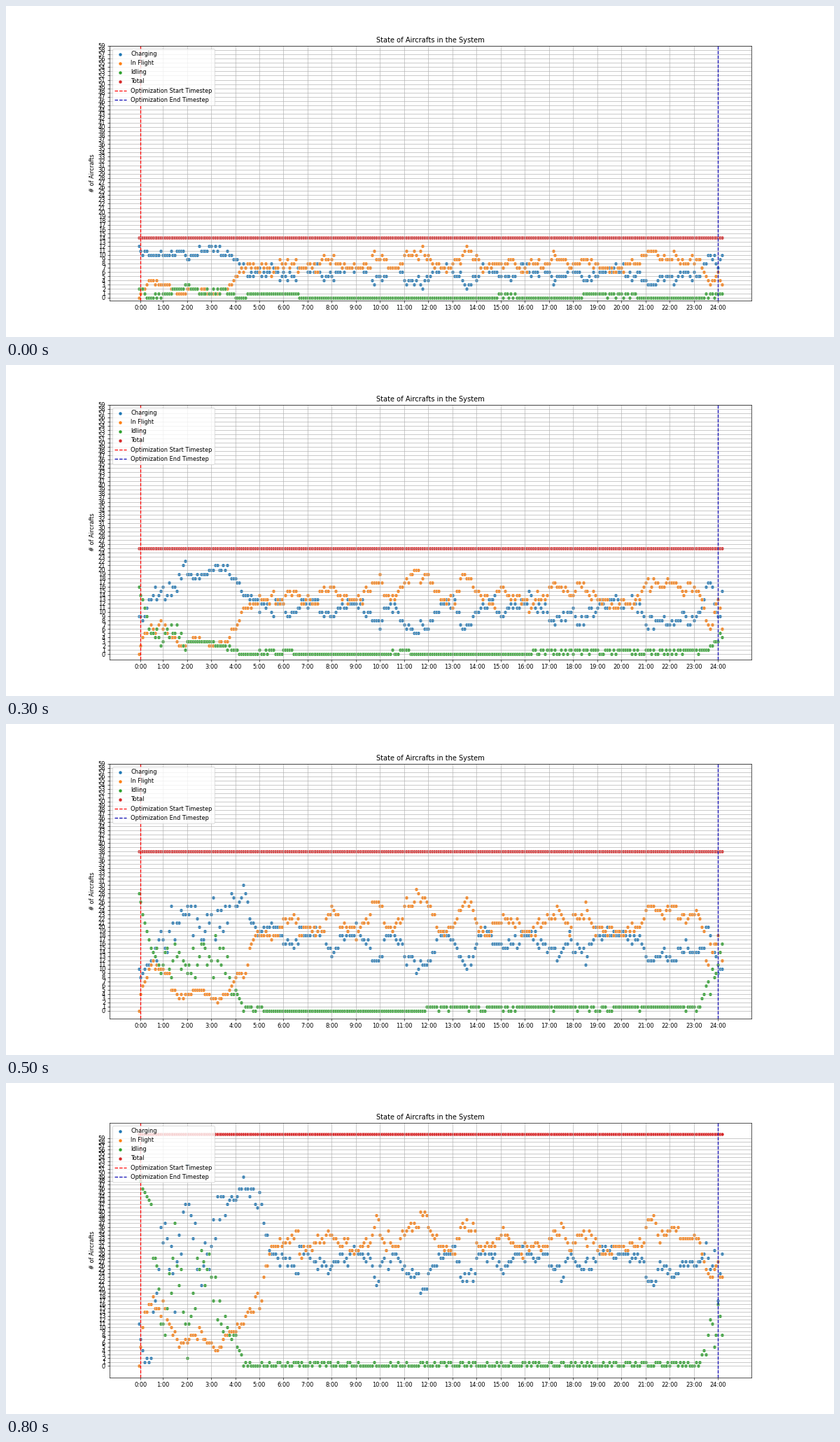
A matplotlib script for the animation above (900 ms loop, 1183 by 473 pixels).

```python
import matplotlib.pyplot as plt
import numpy as np
from matplotlib.animation import FuncAnimation

W, H, DPI = 1183, 473, 59.15
HOURS = np.arange(291) / 12     # five-minute timesteps
STEPS = HOURS * 12
N = len(STEPS)

# Demand peaks of the day: hour and height.
PEAKS = [(6.2, 3), (8, 5), (9.85, 8), (11.2, 8), (11.85, 9), (13.6, 9),
         (15.2, 4), (17.3, 6), (18.4, 5), (21.2, 8.5), (22.1, 6.5), (23, 5)]


def bell(center, width):
    return np.exp(-((HOURS - center) / width) ** 2 / 2)


SWING = (sum(v * bell(h, .3) for h, v in PEAKS) - 9 * bell(23.65, .2)
         - 60 * np.clip(HOURS - 24, 0, 1))


def fleet(total, gain, rise, morning, last, *spells):
    """Mean flying and idling counts; spells are (start, end, idle level)."""
    share = np.interp(HOURS,
                      [0, .1, .4, 1, 1.65, 2.4, 3.2, 3.7, rise - .4, rise],
                      [0, .12, .27, .25, .08, .15, .06, .14, .27, .5])
    idle = np.interp(HOURS, np.arange(len(morning) + 1) / 2, morning + [0])
    for start, end, level in spells:
        idle[(HOURS >= start) & (HOURS < end)] = level
    idle += last * np.clip(HOURS - 23.2, 0, 1)
    return total, total * share + gain * SWING, idle


def between(total, a, b):
    return total, (a[1] + b[1]) / 2, (a[2] + b[2]) / 2


xs = fleet(14, .4, 4.3, [2, 0, .7, 1.5, 2.5, 1.6, 1, 2, .4], 1,
           (4.5, 6.6, 1), (14.6, 15.6, .7), (18.4, 20.6, .9))
small = fleet(19, .53, 4.8, [14, 7, 4, 5, 3, 1, 5, 2, 2], 6,
              (4.7, 6.5, .8), (10.4, 11.2, 1), (15.9, 24, .4))
medium = fleet(32, .68, 4.3, [18, 3, 5, 7, 2, 5, 1, 2, 0], 0,
               (16.5, 23.5, .9), (24.05, 25, 2))
large = fleet(38, .8, 4.8, [28, 15, 12, 11, 8, 15, 12, 14, 4], 13,
              (4.3, 5.3, .6), (11.9, 25, .8))
xl = fleet(48, 1, 5.2, [31, 20, 9, 18, 3, 22, 8, 8, 3], 4, (4.3, 25, .15))
full = fleet(60, .85, 5.4, [49, 42, 9, 31, 4, 30, 22, 9, 7], 17,
             (4.3, 25, .4))

RUNS = [xs, between(17, xs, small), small, between(25, small, medium),
        medium, large, between(43, large, xl), xl, full]


def counts(i):
    """Whole numbers of charging, flying, idling and all aircraft."""
    total, fly, idle = RUNS[i]
    rng = np.random.default_rng(40 + i)
    wobble = np.repeat(rng.normal(size=N // 2 + 1), 2)[:N]
    spread = np.clip(fly / 8, 0, .7 + total / 100)
    fly = np.rint(fly + spread * (.8 * wobble + .5 * rng.normal(size=N)))
    fly[0] = 0
    jitter = np.where((idle > 3) & (HOURS > .5), .25 * idle, 0)
    idle = np.floor(idle + rng.random(N) + jitter * rng.normal(size=N))
    fly = np.clip(fly, 0, total)
    idle = np.clip(idle, 0, total - fly)
    return total - fly - idle, fly, idle, np.full(N, total)


DATA = [counts(i) for i in range(len(RUNS))]

plt.rcParams["font.family"] = "DejaVu Sans"
fig, ax = plt.subplots(figsize=(W / DPI, H / DPI), dpi=DPI)

dots = [ax.scatter(STEPS, y, label=name, s=36, edgecolors="w", linewidths=.48)
        for name, y in zip(("Charging", "In Flight", "Idling", "Total"),
                           DATA[0])]
ax.axvline(1, color="r", ls="--", label="Optimization Start Timestep")
ax.axvline(288, color="#0d08b4", ls="--", label="Optimization End Timestep")

ax.set_title("State of Aircrafts in the System")
ax.set_ylabel("# of Aircrafts")
ax.set_xticks([1, *range(12, 289, 12)], [f"{h}:00" for h in range(25)])
ax.set_yticks(range(60))
ax.set_xlim(-14.5, 304.5)
ax.grid(True)
ax.legend(loc="upper left")


def update(i):
    for dot, y in zip(dots, DATA[i]):
        dot.set_offsets(np.column_stack([STEPS, y]))
    total = RUNS[i][0]
    ax.set_ylim(-.05 * total, max(59, 1.05 * total))
    return dots


anim = FuncAnimation(fig, update, frames=len(RUNS), interval=100, repeat=True)
plt.show()
```
